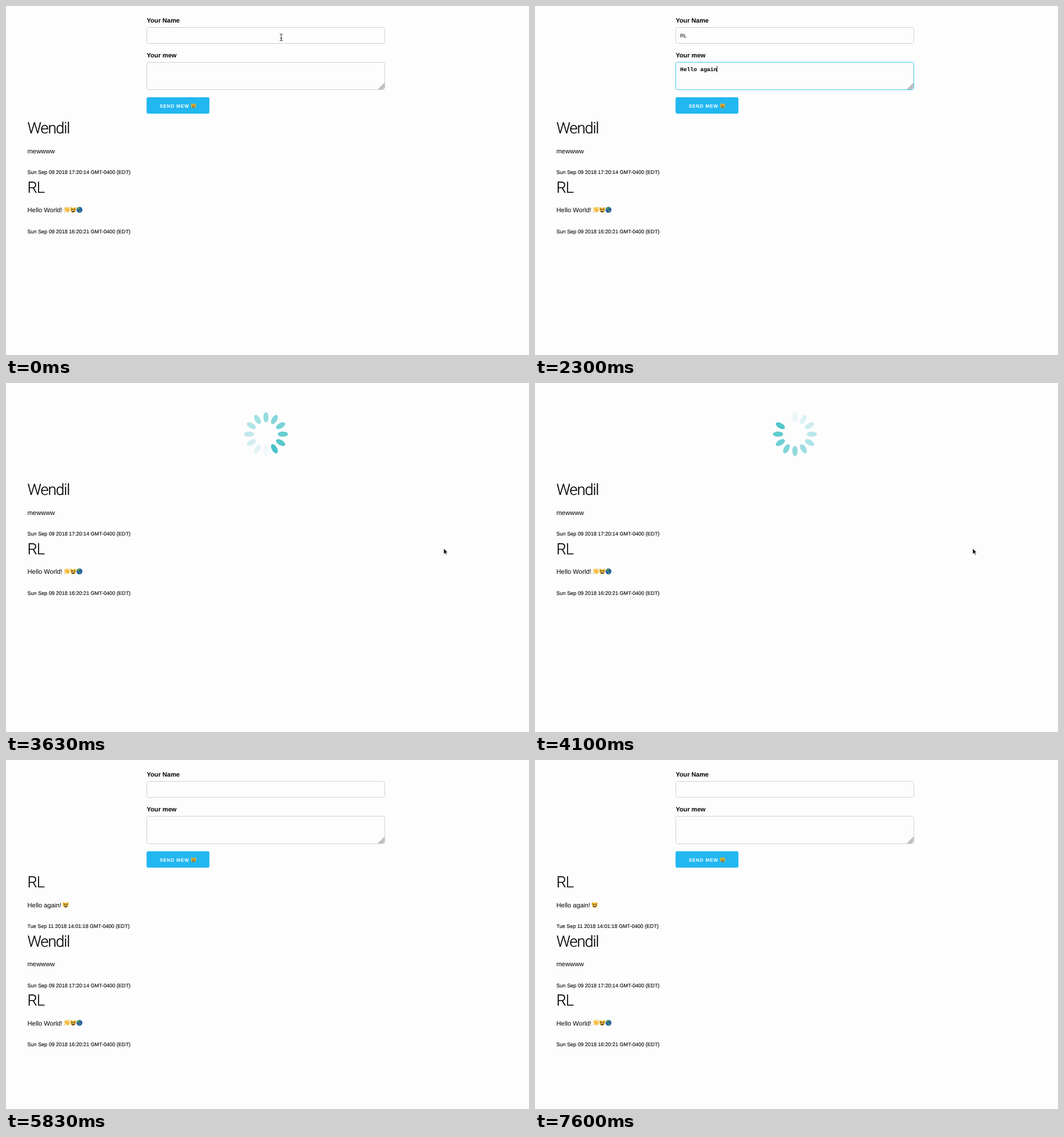
An HTML page that plays this animation: 916x611 px, repeating every 7.63 s.

```html
<!DOCTYPE html>
<html lang="en">
<head>
<meta charset="utf-8">
<title>Send a mew</title>
<style>
  html, body { margin: 0; width: 100%; height: 100%; overflow: hidden; background: #fefdfe; }
  svg { display: block; }
  text { font: 11.25px "Liberation Sans", Arial, sans-serif; fill: #000; white-space: pre; text-rendering: geometricPrecision; }
  .label { font-weight: bold; font-size: 11.1px; }
  .title { font: 300 27.25px Roboto, "Liberation Sans", sans-serif; letter-spacing: -1.1px; stroke: #000; stroke-width: .2; }
  .date { font-size: 9.1px; stroke: #000; stroke-width: .12; }
  .field { font-size: 9px; }
  .mono { font: bold 9.75px "Liberation Mono", monospace; }
  .send { font-weight: bold; font-size: 8.25px; letter-spacing: .83px; fill: #fff; }
  .box { fill: #fefdfe; stroke: #d1d1d1; }
  .box.focus { stroke: #3fc4e4; }
  .menu { filter: drop-shadow(0 3px 3px rgba(0, 0, 0, .65)); }
  .grip { stroke: #333; stroke-width: .9; }
</style>
</head>
<body>
<svg width="916" height="611" viewBox="0 0 916 611">
  <defs>
    <g id="cat">
      <path d="M-4.7-5 -1.5-3.5H1.5L4.7-5 5 .5Q4.7 4.7 0 4.8T-5 .5Z" fill="#f0bc30"/>
      <path d="M-4-3.6-2.4-2.7-3.9-1.4ZM4-3.6 2.4-2.7 3.9-1.4Z" fill="#b9802a"/>
      <path d="M-3.2-.2Q-2-1.9-.8-.2M.8-.2Q2-1.9 3.2-.2" fill="none" stroke="#33291a" stroke-width="1.1"/>
      <path d="M-3.2 1.2H3.2Q2.4 4.3 0 4.3T-3.2 1.2Z" fill="#46321c"/>
      <path d="M-2.2 1.4H2.2V2.2H-2.2Z" fill="#fff"/>
    </g>
    <g id="wave">
      <path d="M-3.6-3.3 .8 1M-1.4-4.2 2.4 0M.8-3.6 3.3-.3M-4.2-.8 0 3M4-1.6 3.4 2" stroke="#f5bd3b" stroke-width="1.7" stroke-linecap="round"/>
      <path d="M-2.5-.4 1-2.2 4 0 3.8 3Q2 5.4-.5 3.6Z" fill="#f5bd3b"/>
      <path d="M-4.8 2.4Q-4.4 4.3-2.6 4.7M2.5-4.9Q4.5-4.7 4.8-3" fill="none" stroke="#a87a28" stroke-width=".7"/>
    </g>
    <g id="globe">
      <circle r="5.2" fill="#1f5fae"/>
      <path d="M-4-2.8Q-1.5-5.4 1.6-4.6L.6-2.4-.8-1.6-1.4.2-3.4-.8ZM-.6.4 2.4 1.2 2 3 .4 4.6-.6 2.6ZM3.4-3.4 4.8-1 3.8-.6Z" fill="#5b9a4c"/>
    </g>
  </defs>

  <g id="form">
    <text class="label" x="246.5" y="29">Your Name</text>
    <rect id="nameBox" class="box" x="246.5" y="37.5" width="417" height="28" rx="3"/>
    <text id="nameText" class="field" x="254.3" y="54.8"></text>
    <text class="label" x="246.5" y="90">Your mew</text>
    <rect id="mewBox" class="box" x="246.5" y="98.5" width="417" height="48" rx="3"/>
    <path class="grip" d="M652.5 146 663 135.5M655.5 146 663 138.5M658.5 146 663 141.5"/>
    <text id="mewText" class="mono" x="254.3" y="114"></text>
    <use id="mewCat" href="#cat" x="335" y="110"/>
    <path id="caret" d="M0 0V11" stroke="#111"/>
    <rect id="button" x="246.2" y="159.7" width="110.1" height="28.7" rx="3"/>
    <text class="send" x="269.2" y="178.2">SEND MEW</text>
    <use href="#cat" transform="translate(328.5 174.6) scale(.86)"/>
    <g id="menu">
      <rect class="menu" x="247" y="66" width="416.5" height="14" fill="#fefdfe"/>
      <text class="field" x="249.8" y="76.2">RL</text>
    </g>
  </g>

  <g id="spinner" transform="translate(455.3 89.5)" fill="#45c2c7"></g>
  <g id="posts"></g>

  <g id="beam" fill="none">
    <path d="M-2.5-6Q0-6 0-4.5Q0-6 2.5-6M0-4.5V4.5M-2.5 6Q0 6 0 4.5Q0 6 2.5 6M-1.5 1.5H1.5" stroke="#222"/>
  </g>
  <path id="hand" d="M-2.2-5Q-1-6.2 0-4.8V-1.4Q1-2.2 1.8-1.2Q3-1.8 3.6-.6Q5.2-1 5.2 .7V3Q4.5 4.2 4.2 6.2H-1.6Q-2-.0-4.6 1.8Q-5.6 .2-4-.2L-2.2 1.2Z" fill="#fff" stroke="#111"/>
  <path id="arrow" d="M0 0V10.2L2.3 8.1 3.9 11.7 5.6 10.9 4 7.5H7.1Z" fill="#111" stroke="#fff" stroke-width=".7"/>
</svg>

<script>
const LOOP = 7630;
const POST_STEP = 103.3;
const PETALS = 12;
const SPIN_PERIOD = 1000;
const MESSAGE = "Hello again!";
const NAME = "RL";

// Moments in the story, in ms.
const at = {
  focusName: 330, typeName: 1020, secondLetter: 1170, focusMew: 1600,
  typeMew: 1660, typedMew: 2340, emoji: 2460, aim: 2540, onButton: 2860,
  send: 3080, rest: 3480, loaded: 4230, leave: 4800, gone: 5520
};

const $ = id => document.getElementById(id);
const show = (id, on) => $(id).style.display = on ? "" : "none";
const place = (id, x, y) => $(id).setAttribute("transform", `translate(${x} ${y})`);
const progress = (t, from, to) => Math.min(1, Math.max(0, (t - from) / (to - from)));
const ease = p => p * p * (3 - 2 * p);
const mix = (a, b, p) => a + (b - a) * p;

function post(id, row, name, body, date, emojis = [], emojiX = 0) {
  const icons = emojis.map((emoji, i) =>
    `<use href="#${emoji}" x="${emojiX + i * 11}" y="253.5"/>`).join("");
  return `<g id="${id}" transform="translate(0 ${row * POST_STEP})">
    <text class="title" x="37.5" y="223.3">${name}</text>
    <text x="37.5" y="258.2">${body}</text>${icons}
    <text class="date" x="37.5" y="294.3">${date} GMT-0400 (EDT)</text></g>`;
}

$("posts").innerHTML =
  post("newPost", 0, NAME, MESSAGE, "Tue Sep 11 2018 14:01:18", ["cat"], 104.5) +
  `<g id="oldPosts">` +
  post("second", 0, "Wendil", "mewwww", "Sun Sep 09 2018 17:20:14") +
  post("first", 1, NAME, "Hello World!", "Sun Sep 09 2018 16:20:21", ["wave", "cat", "globe"], 106.7) +
  `</g>`;

$("spinner").innerHTML = Array.from({ length: PETALS }, (_, i) =>
  `<ellipse cy="-29.6" rx="4.6" ry="9" transform="rotate(${i * 360 / PETALS})"/>`).join("");

function drawFields(t) {
  const filling = t < at.send;
  const inName = t >= at.focusName && t < at.focusMew;
  const inMew = t >= at.focusMew && filling;
  const nameCount = filling ? (t >= at.typeName) + (t >= at.secondLetter) : 0;
  const mewCount = filling
    ? Math.floor(progress(t, at.typeMew, at.typedMew) * MESSAGE.length) : 0;

  $("nameBox").classList.toggle("focus", inName);
  $("mewBox").classList.toggle("focus", inMew);
  $("nameText").textContent = NAME.slice(0, nameCount);
  $("mewText").textContent = MESSAGE.slice(0, mewCount);
  show("mewCat", filling && t >= at.emoji);
  show("menu", t >= at.typeName + 40 && t < at.focusMew);
  show("caret", inName || (inMew && t < at.emoji));
  if (inName) place("caret", [254.5, 261, 266][nameCount], 46);
  else place("caret", 254.5 + mewCount * 5.85, 105);
}

function drawSpinner(t) {
  [...$("spinner").children].forEach((petal, i) => {
    const phase = (t - 3620) / SPIN_PERIOD - (i - 5) / PETALS;
    petal.setAttribute("opacity", 1 - (phase - Math.floor(phase)));
  });
}

function drawPointer(t) {
  const aiming = ease(progress(t, at.aim, at.onButton));
  const x = mix(482, 323, aiming), y = mix(55, 181, aiming);
  const overButton = t >= at.aim && t < at.send && y > 160 && x < 356;
  show("beam", t < at.typeName || (t >= at.aim && t < at.send && !overButton));
  show("hand", overButton);
  show("arrow", t >= at.send && t < at.gone);
  place("beam", x, y);
  place("hand", x, y);

  const away = ease(progress(t, at.send, at.rest));
  const exit = ease(progress(t, at.leave, at.gone));
  place("arrow", mix(mix(321, 766.6, away), 13, exit), mix(mix(176, 289.5, away), -12, exit));
  $("button").setAttribute("fill", overButton ? "#059fdb" : "#22b7f0");
}

function draw(t) {
  const loading = t >= at.send && t < at.loaded;
  const done = t >= at.loaded;
  show("form", !loading);
  show("spinner", loading);
  show("newPost", done);
  place("oldPosts", 0, done ? POST_STEP : 0);
  place("posts", 0, loading ? -27 : 0);
  drawFields(t);
  drawSpinner(t);
  drawPointer(t);
}

const start = performance.now();
function tick() {
  draw((performance.now() - start) % LOOP);
  requestAnimationFrame(tick);
}
tick();
</script>
</body>
</html>
```
